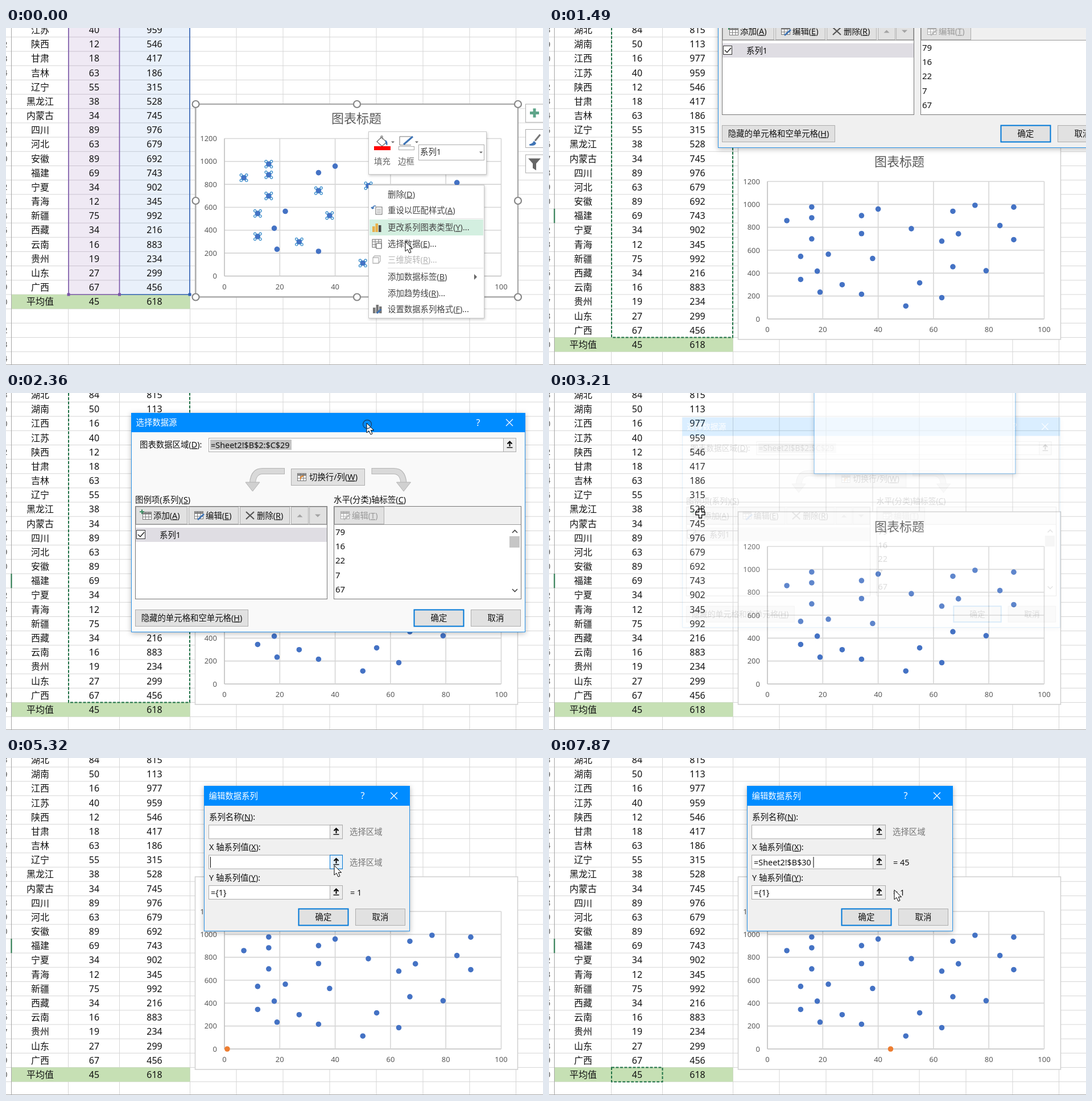
An HTML page for the animation above (8000 ms loop, 944 by 593 pixels).

```html
<!DOCTYPE html>
<html lang="zh">
<head>
<meta charset="utf-8">
<title>Scatter chart data source</title>
<style>
html, body { margin: 0; width: 100%; height: 100%; overflow: hidden; background: #fff; }
svg { display: block; width: 944px; height: 593px; overflow: hidden; }
text { font-family: "Noto Sans", "Noto Sans CJK SC", "Noto Sans CJK", sans-serif; white-space: pre; }
.dialog { filter: drop-shadow(0 2px 5px rgba(0, 0, 0, .28)); }
</style>
</head>
<body>
<svg id="stage" viewBox="0 0 944 593"></svg>
<script>
const LOOP = 8000;
const STEPS = [0, 210, 430, 640, 850, 1070, 1280, 1490, 1710, 1920, 2150, 2360, 2570, 2790, 3000, 3210,
  3420, 3640, 3820, 4470, 4680, 4890, 5100, 5320, 5530, 5740, 5950, 6160, 6370, 6590, 6800, 7010, 7230,
  7440, 7660, 7870];
const ROW = 25.17, AVG_TOP = 544.5;
const COLS = [109.5, 199.5, 323.5, 405, 487, 569, 651, 733, 815, 896.5];
const NAMES = '湖北 湖南 江西 江苏 陕西 甘肃 吉林 辽宁 黑龙江 内蒙古 四川 河北 安徽 福建 宁夏 青海 新疆 西藏 云南 贵州 山东 广西'.split(' ');
// rows 2 to 29 of the sheet
const DATA = [[79, 421], [16, 699], [22, 565], [7, 858], [67, 940], [52, 788], [84, 815], [50, 113],
  [16, 977], [40, 959], [12, 546], [18, 417], [63, 186], [55, 315], [38, 528], [34, 745], [89, 976],
  [63, 679], [89, 692], [69, 743], [34, 902], [12, 345], [75, 992], [34, 216], [16, 883], [19, 234],
  [27, 299], [67, 456]];
const PLAIN = [2, 6, 9, 11, 20, 23, 25];   // points without selection rings

const rowTop = n => AVG_TOP + (n - 30) * ROW;
const px = v => 384 + v * 4.865;
const py = v => 512 - v * 242 / 1200;

// ---- markup helpers ----
const rect = (x, y, w, h, fill, stroke = 'none', sw = 1) =>
  `<rect x="${x}" y="${y}" width="${w}" height="${h}" fill="${fill}" stroke="${stroke}" stroke-width="${sw}"/>`;
const path = (d, stroke, sw = 1, fill = 'none') =>
  `<path d="${d}" fill="${fill}" stroke="${stroke}" stroke-width="${sw}"/>`;
const dot = (x, y, r, fill, stroke = 'none', sw = 1) =>
  `<circle cx="${x}" cy="${y}" r="${r}" fill="${fill}" stroke="${stroke}" stroke-width="${sw}"/>`;
const text = (x, y, s, fill = '#111', size = 14.4, anchor = 'start') =>
  `<text x="${x}" y="${y + size * .36}" font-size="${size}" fill="${fill}" text-anchor="${anchor}">` +
  s.replace(/\(([A-Z])\)/, '(<tspan text-decoration="underline">$1</tspan>)') + '</text>';
const group = (id, body, cls = '') => `<g id="${id}" class="${cls}">${body}</g>`;
const range = (n, f) => Array.from({ length: n }, (_, i) => f(i)).join('');

// ---- sheet ----
function sheet() {
  const header = n => text(2.5, rowTop(n) + ROW / 2, String(n), '#555', 14, 'end');
  const grid = range(30, i => path(`M0 ${rowTop(8 + i)}H944`, '#d6d6d6')) +
    COLS.map(x => path(`M${x} 0V700`, '#d6d6d6')).join('');
  const fills = rect(110, -30, 90, AVG_TOP + 30, '#7030a0', 'none') + rect(200, -30, 123, AVG_TOP + 30, '#2f75d6');
  const frame = path(`M110 -30V${AVG_TOP}H199.5V-30`, '#7a55a8', 1.6) +
    path(`M200 ${AVG_TOP}H323V-30`, '#2f5fb3', 1.6) +
    [[110, '#7a55a8'], [199.5, '#7a55a8'], [323, '#2f5fb3']].map(([x, c]) => rect(x - 2.5, AVG_TOP - 2.5, 5, 5, c)).join('');
  const cells = (y, a, b, c) => text(60, y, a, '#111', 16, 'middle') +
    text(155, y, b, '#111', 16, 'middle') + text(261, y, c, '#111', 16, 'middle');
  const rows = NAMES.map((name, i) => cells(rowTop(8 + i) + ROW / 2, name, ...DATA[6 + i].map(String))).join('');
  return grid + rect(10, AVG_TOP, 313.5, ROW, '#c6e0b4') +
    group('picked', `<g opacity=".1">${fills}</g>` + frame) +
    range(29, i => header(8 + i)) + path('M9.5 0V700', '#a6a6a6') +
    group('active', path(`M9.5 ${rowTop(21)}v${ROW}`, '#217346', 2)) +
    rows + cells(AVG_TOP + ROW / 2, '平均值', '45', '618') +
    `<path id="ants" fill="none" stroke="#1f7145" stroke-width="2" stroke-dasharray="5 2.5"/>`;
}

// ---- chart ----
function chart() {
  const blue = '#4472c4';
  const lines = range(7, i => path(`M384 ${py(i * 200)}H870.5`, i ? '#d6d6d6' : '#bfbfbf', 1.6) +
      text(371, py(i * 200), String(i * 200), '#595959', 13, 'end')) +
    range(6, i => path(`M${px(i * 20)} 270V512`, i ? '#d6d6d6' : '#bfbfbf', 1.6) +
      text(px(i * 20), 530.5, String(i * 20), '#595959', 13, 'middle'));
  const points = DATA.map(([a, b]) => dot(px(a), py(b), 4.8, blue)).join('');
  const rings = DATA.map(([a, b], i) => PLAIN.includes(i) ? '' :
    [[-1, -1], [1, -1], [-1, 1], [1, 1]].map(([u, v]) =>
      dot(px(a) + u * 4.7, py(b) + v * 4.7, 2.1, '#fff', '#2e86c8', 1.2)).join('')).join('');
  const handles = [333.5, 617, 900].map(x => [209.5, 379.5, 549].map(y =>
    x === 617 && y === 379.5 ? '' : dot(x, y, 6, '#fff', '#868686', 2.2)).join('')).join('');
  const side = [209.5, 254, 298.5].map(y => rect(913.5, y, 33, 32, '#fff', '#ababab')).join('') +
    path('M929 217v16M921 225h16', '#5fa58a', 5) +
    path('M920 280q6 -1 8 -6l4 4q-2 6 -12 4z', 'none', 0, '#3f74b5') + path('M930 274l9 -11', '#777', 3) +
    path('M918 305h22l-8 9v12l-6 -4v-8z', 'none', 0, '#666');
  return rect(332.5, 209, 567, 339, '#fff', '#cfcfcf', 1.5) + lines +
    text(616, 235, '图表标题', '#595959', 22, 'middle') + points +
    `<circle id="extra" cy="512" r="4.8" fill="#ed7d31"/>` +
    group('chosen', rect(333.5, 209.5, 566.5, 339.5, 'none', '#a6a6a6', 2) + rings + handles + side);
}

// ---- context menu ----
function menu() {
  const items = [[292.5, '删除(D)'], [320.5, '重设以匹配样式(A)'], [351, '更改系列图表类型(Y)...'], [379.5, '选择数据(E)...'],
    [408, '三维旋转(R)...'], [438, '添加数据标签(B)'], [467, '添加趋势线(R)...'], [495, '设置数据系列格式(F)...']];
  const arrow = (x, y) => path(`M${x - 3} ${y - 1.5}h6l-3 3z`, 'none', 0, '#666');
  const bars = (x, y, cs) => cs.map((c, i) => rect(x + i * 5.5, y - [10, 15, 12][i], 4.5, [10, 15, 12][i], c)).join('');
  const shade = 'style="filter:drop-shadow(1px 2px 2px rgba(0,0,0,.2))"';
  return `<g ${shade}>` + rect(637.5, 182.5, 207, 75, '#fff', '#c8c8c8') + rect(637.5, 276.5, 203, 234, '#fff', '#c8c8c8') + '</g>' +
    path('M652 200l8 -8 9 9 -8 7z', '#666', 1.2, '#fff') + path('M659 195v-5h3v6', '#666') +
    path('M667 197q5 3 3 10q-4 -3 -3 -10z', 'none', 0, '#3f74b5') + rect(647, 208, 29, 7, '#f00') + arrow(680, 201) +
    path('M692 191h20M692 191v15h20', '#777') + path('M699 205l16 -14', '#3f74b5', 3) +
    rect(690.5, 208.5, 27, 6, '#fff', '#aaa') + arrow(722, 201) +
    rect(725.5, 205.5, 115, 27, '#fff', '#ababab') + text(728, 217.5, '系列1', '#333') + arrow(835, 219) +
    text(647, 235, '填充', '#666') + text(689, 235, '边框', '#666') +
    `<rect id="hover" x="639" width="200" height="28" fill="#d3efe0"/>` +
    path('M671 335.5H839M671 422.5H839', '#e1e1e1') +
    items.map(([y, s], i) => text(671, y, s, i === 4 ? '#b5b5b5' : '#444')).join('') +
    path('M823 433l5 5 -5 5z', 'none', 0, '#666') +
    rect(650, 315, 11, 13, '#fff', '#666') + path('M652 319h7M652 322h7M652 325h7', '#888') +
    path('M644 318q0 -5 6 -5M644 318l-2 -3M644 318l3 -2', '#3f74b5', 1.6) +
    bars(644, 359, ['#e8b04c', '#e8b04c', '#4a4a4a']) +
    rect(644, 372, 16, 14, '#fff', '#666') + path('M644 376h16M649 372v14M655 372v14M644 381h16', '#777') + rect(651, 379, 9, 9, '#fff', '#555') +
    path('M645 404l3 -3h10v9l-3 4h-10zM645 404h10v10', '#b5b5b5', 1.3) +
    bars(645, 502, ['#777', '#777', '#777']) + path('M652 502l7 -7', '#3f74b5', 3);
}

// ---- dialogs ----
const button = (x, y, w, h, s = '', main = false, off = false) =>
  rect(x + .5, y + .5, w - 1, h - 1, '#e1e1e1', main ? '#0078d7' : '#adadad', main ? 2 : 1) +
  text(x + w / 2, y + h / 2, s, off ? '#999' : '#111', 14.4, 'middle');
const refBox = (x, y, w) => rect(x + .5, y + .5, w - 1, 24, '#fff', '#ababab') + rect(x + w - 22.5, y + .5, 22, 24, '#eee', '#ababab') +
  upIcon(x + w - 11.5, y + 12);
const upIcon = (x, y) => path(`M${x} ${y + 3}v-7M${x - 4} ${y - 1.5}l4 -4 4 4`, '#000', 2) + path(`M${x - 5} ${y + 5}h10`, '#000', 1.4);
const titleBar = (w, h, s) => rect(0, 0, w, h, '#008cff') + text(8.5, h / 2, s, '#fff') +
  text(w - 83, h / 2, '?', '#fff', 16, 'middle') + path(`M${w - 34} ${h / 2 - 6}l12 12m0 -12l-12 12`, '#fff', 1.2);
const gridIcon = (x, y, c, pen) => rect(x + .5, y + .5, 15, 13, '#fff', c) +
  path(`M${x} ${y + 3}h16`, c, 3) + path(`M${x} ${y + 9}h16M${x + 5.5} ${y}v14M${x + 11} ${y}v14`, c) +
  (pen ? path(`M${x + 6} ${y + 15}l11 -10`, pen, 3) : '');

function sourceDialog() {
  const bent = path('M270 102.5H231Q215 102.5 213.500 123', '#b4b4b4', 11) + path('M269 102.5H231Q215 102.5 213.500 124', '#d9d9d9', 9) +
    path('M201 122h25l-12.500 16z', '#b4b4b4', 1, '#d0d0d0');
  const tri = (x, y, k) => path(`M${x - 5} ${y + 2.5 * k}h10l-5 ${-5 * k}z`, 'none', 0, '#a3a3a3');
  return `<rect id="sourceBody" x=".5" y=".5" width="692" height="385" stroke="#2a93e8"/>` + titleBar(693, 34, '选择数据源') +
    text(15, 56, '图表数据区域(D):') + refBox(136, 44, 541) + rect(139, 47, 143, 18, '#c4c4c4') + text(140, 56.5, '=Sheet2!$B$2:$C$29') +
    bent + `<g transform="translate(692.500 0) scale(-1 1)">${bent}</g>` +
    button(281, 98, 130, 30) + gridIcon(292, 106, '#777') + path('M298 117q-2 -5 5 -6', '#d9822b', 2) + text(313, 113, '切换行/列(W)') +
    text(7, 153, '图例项(系列)(S)') + text(356, 153, '水平(分类)轴标签(C)') +
    rect(7.5, 164.5, 337, 163, '#fff', '#777') + rect(8, 165, 336, 31, '#f0f0f0') + path('M7.5 196.500H344', '#999') +
    button(8, 165, 91, 31) + gridIcon(20, 174, '#777') + path('M19 170v8M15 174h8', '#3c8f63', 2) + text(39, 181, '添加(A)') +
    button(101, 165, 88, 31) + gridIcon(111, 173, '#777', '#3f74b5') + text(131, 181, '编辑(E)') +
    button(191, 165, 88, 31) + path('M202 174l14 13m0 -13l-14 13', '#555', 2.2) + text(221, 181, '删除(R)') +
    button(281, 165, 31, 31) + tri(296.5, 181, 1) + button(313, 165, 31, 31) + tri(328, 181, -1) +
    rect(8, 202, 336, 25, '#dfdde3') + rect(9.5, 206.5, 15, 15, '#fff', '#333') + path('M12 214l4 4 7 -8', '#222', 1.5) + text(50, 214.5, '系列1') +
    rect(356.5, 164.5, 329, 163, '#fff', '#777') + rect(357, 165, 328, 31, '#f0f0f0') + path('M356.500 196.500H685', '#999') +
    button(357, 165, 88, 31) + gridIcon(368, 173, '#aaa', '#bbb') + text(388, 181, '编辑(T)', '#999') +
    [79, 16, 22, 7, 67].map((v, i) => text(359, 209.5 + i * 25.2, String(v), '#111', 15)).join('') +
    rect(665, 217, 18, 20, '#c6c6c6') + path('M670 211l4.500 -4.500 4.500 4.500M670 310l4.500 4.500 4.500 -4.500', '#444', 1.6) +
    button(7, 346, 199, 30, '隐藏的单元格和空单元格(H)') + button(497, 346, 88, 30, '确定', true) + button(597, 346, 88, 30, '取消');
}

function seriesDialog() {
  const full = text(9, 54.5, '系列名称(N):') + refBox(8, 68.5, 236) + text(256, 81, '选择区域', '#777') +
    text(9, 108, 'X 轴系列值(X):') + refBox(8, 121.5, 236) +
    group('hot', rect(221.5, 122, 22, 24, '#e5f1fb', '#0078d7') + upIcon(232.5, 133.5)) +
    text(9, 161.5, 'Y 轴系列值(Y):') + refBox(8, 175, 236) + text(12, 188, '={1}') + text(257, 188, '= 1') +
    group('noX', path('M11.500 125v19', '#000') + text(256, 134.5, '选择区域', '#777')) +
    group('hasX', text(12, 134.5, '=Sheet2!$B$30') + path('M117 125v19', '#000') + text(257, 134.5, '= 45')) +
    button(166, 216, 88, 30, '确定', true) + button(266, 216, 88, 30, '取消');
  return `<rect id="seriesBody" x=".5" y=".5" width="361" stroke="#2a93e8"/>` +
    group('seriesUi', titleBar(362, 35, '编辑数据系列') + group('full', full) +
      group('mini', refBox(8, 44, 346) + group('miniText', text(12, 57, '=Sheet2!$B$30'))));
}

const arrowPath = 'M0 0V17L4 13.500L7 20L10 18.700L7.300 12.500H12.500Z';
const plusPath = 'M-2.500 -8h5v5.500h5.500v5h-5.500v5.500h-5v-5.500h-5.500v-5h5.500z';
const movePath = 'M-7 0H7M0 -7V7M-7 0l3 -2.500v5zM7 0l-3 -2.500v5zM0 -7l-2.500 3h5zM0 7l-2.500 -3h5z';

document.getElementById('stage').innerHTML = rect(0, 0, 944, 593, '#fff') +
  group('sheet', sheet() + chart()) + path('M0 592.500H944', '#a6a6a6') + group('menu', menu()) +
  group('source', sourceDialog(), 'dialog') + group('series', seriesDialog(), 'dialog') +
  group('cursor', group('arrow', path(arrowPath, '#000', 1, '#fff')) + group('plus', path(plusPath, '#000', 1.3, '#fff')) +
    group('move', path(movePath, '#000', 1.4, '#000')) + group('ring', dot(1, 2, 7.5, 'none', '#17456f', 1.3)));

// ---- animation ----
const el = {};
document.querySelectorAll('[id]').forEach(e => el[e.id] = e);
const show = (id, on) => { el[id].style.display = on ? '' : 'none'; };
const set = (id, name, v) => el[id].setAttribute(name, v);

// linear interpolation over [time, x, y] keys
function along(keys, t) {
  const i = keys.findIndex(k => k[0] > t);
  if (i < 0) return keys[keys.length - 1].slice(1);
  if (i === 0) return keys[0].slice(1);
  const a = keys[i - 1], b = keys[i], p = (t - a[0]) / (b[0] - a[0]);
  return [a[1] + (b[1] - a[1]) * p, a[2] + (b[2] - a[2]) * p];
}

const SOURCE_POS = [[1490, 297, -175], [2150, 228, 14], [2360, 220, 35]];
const SERIES_POS = [[3820, 462, -111], [4470, 440, -80], [4890, 348, 49]];
const POINTER = [[0, 702, 376], [210, 703, 386], [850, 703, 386], [1280, 711, 20], [1490, 711, -157],
  [2150, 642, 32], [2360, 634, 53], [2570, 600, 75], [3000, 268, 212], [3210, 266, 212], [3640, 600, -60],
  [3820, 662, -93], [4470, 640, -62], [4890, 548, 67], [5320, 577, 189], [5530, 577, 189], [6160, 155, 557], [6590, 155, 557],
  [7230, 685, 104], [7440, 687, 100], [7870, 607, 232]];

function place(id, [x, y], w, h, k, opacity) {
  set(id, 'transform', `translate(${x + w / 2 * (1 - k)} ${y + h / 2 * (1 - k)}) scale(${k})`);
  set(id, 'opacity', opacity);
}

function render(time) {
  const t = STEPS.filter(s => s <= time).pop();
  const between = (a, b) => t >= a && t < b;

  set('sheet', 'transform', `translate(0 ${t < 640 ? -3 * ROW : t < 850 ? -ROW : 0})`);
  show('picked', t < 640);
  show('chosen', t < 640);
  show('active', t >= 640);
  show('menu', t < 430);
  set('hover', 'y', t < 210 ? 337 : 365.5);

  const cellPicked = t >= 6160;
  show('ants', between(640, 3210) || cellPicked);
  set('ants', 'd', cellPicked ? `M110 ${AVG_TOP}h89.500v${ROW}h-89.500z` : `M110 -60V${AVG_TOP}H323V-60`);
  set('ants', 'stroke-dashoffset', -(t / 210 * 2 % 7.5));

  const expanded = t >= 7440;
  show('extra', t >= 3420);
  set('extra', 'cx', px(expanded ? 44.5 : 1));

  const opening = t === 640, closing = t === 3210;
  show('source', between(640, 3420));
  place('source', along(SOURCE_POS, t), 693, 386, opening || closing ? .959 : 1, opening ? .32 : closing ? .14 : 1);
  set('sourceBody', 'fill', t < 2360 ? '#f0f0f0' : '#f9f9f9');

  const small = between(5530, 7440);
  show('series', t >= 3210);
  place('series', along(SERIES_POS, t), 362, 256, closing ? .98 : 1, closing ? .6 : 1);
  set('seriesBody', 'height', small ? 78 : 255);
  set('seriesBody', 'fill', closing ? '#fff' : '#f0f0f0');
  show('seriesUi', !closing);
  show('full', !small);
  show('mini', small);
  show('miniText', cellPicked);
  show('hot', t === 5320);
  show('noX', !expanded);
  show('hasX', expanded);

  const [x, y] = along(POINTER, t);
  const plus = closing || (between(5740, 7230) && x < 332);
  set('cursor', 'transform', `translate(${x} ${y})`);
  show('arrow', !plus);
  show('plus', plus);
  show('move', between(430, 1070));
  show('ring', t === 2360);
}

function tick(now) {
  render(now % LOOP);
  requestAnimationFrame(tick);
}
render(0);
requestAnimationFrame(tick);
</script>
</body>
</html>
```
